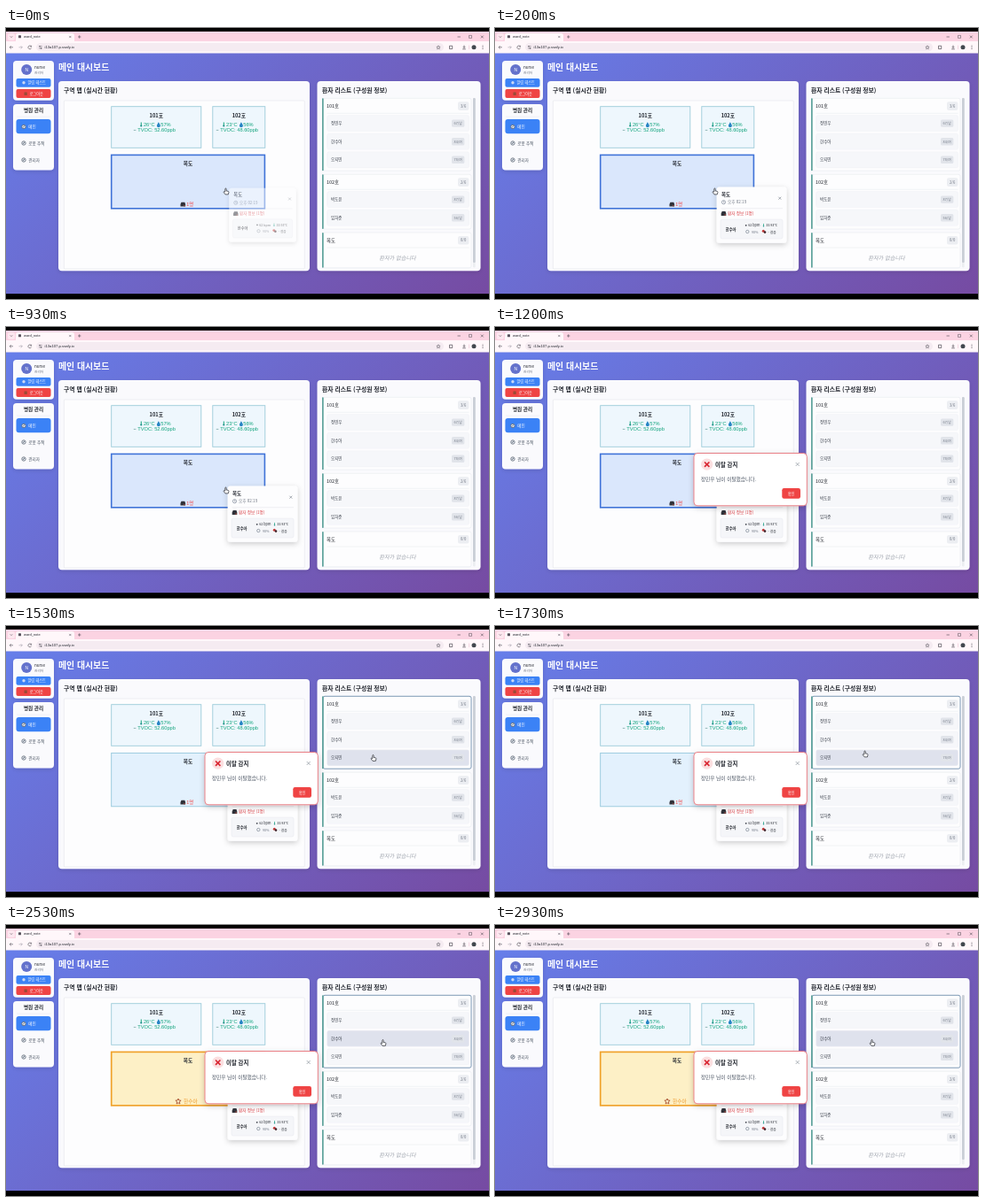
Animation, 544 px wide and 306 px high, one loop 2990 ms. Source, as an HTML page:

```html
<!DOCTYPE html>
<html lang="ko">
<head>
<meta charset="utf-8">
<style>
html, body { margin: 0; width: 100%; height: 100%; overflow: hidden; background: #000; }
svg { display: block; width: 100vw; height: 100vh; }
text { font-family: "Noto Sans CJK KR", "Noto Sans CJK JP", "Noto Sans CJK", sans-serif; white-space: pre; }
.latin { font-family: "Liberation Sans", Arial, sans-serif; }
.b { font-weight: 700; }
.m { font-weight: 500; }
</style>
</head>
<body>
<svg id="stage" viewBox="0 0 544 306"></svg>
<script>
const LOOP = 2990;
const INK = '#20242c', GREY = '#707784', RED = '#ef4444', BLUE = '#3b82f6', GREEN = '#10a37c';

const text = (x, y, size, str, fill = INK, more = '') =>
  `<text x="${x}" y="${y}" font-size="${size}" fill="${fill}" ${more}>${str}</text>`;
const mid = (x, y, size, str, fill, cls = '') =>
  text(x, y, size, str, fill, `text-anchor="middle" class="${cls}"`);
const rect = (x, y, x2, y2, fill, r = 0, more = '') =>
  `<rect x="${x}" y="${y}" width="${x2 - x}" height="${y2 - y}" rx="${r}" fill="${fill}" ${more}/>`;
const dot = (x, y, r, fill, more = '') => `<circle cx="${x}" cy="${y}" r="${r}" fill="${fill}" ${more}/>`;
const line = (d, stroke, w = .6, more = '') =>
  `<path d="${d}" fill="none" stroke="${stroke}" stroke-width="${w}" ${more}/>`;
const shape = (d, fill, more = '') => `<path d="${d}" fill="${fill}" ${more}/>`;
const cross = (x, y, r, stroke, w) =>
  line(`M${x - r} ${y - r}l${2 * r} ${2 * r}m0 ${-2 * r}l${-2 * r} ${2 * r}`, stroke, w);

const drop = (x, y, s = 1) =>
  shape('M0-3C1-1 2 0 2 1A2 2 0 0 1-2 1C-2 0-1-1 0-3Z', '#2684c4', `transform="translate(${x} ${y}) scale(${s})"`);
const thermo = (x, y, s = 1) => `<g transform="translate(${x} ${y}) scale(${s})">` +
  line('M0-2.5V1', GREEN, 1) + dot(0, 1.5, 1.1, '#1b8f86') + '</g>';
const people = (x, y) => shape(
  `M${x - 2.8} ${y + 2.6}v-2.6l1-2.3h3.8l.8 2.3v2.6z`, '#30323a') + dot(x + 1.6, y + 1.6, .9, '#8a4a44');

function chrome() {
  const c = '#4a4650';
  return rect(0, 4, 544, 16, '#fbd3e2') + rect(11, 6, 77, 18, '#fff7fa', 2.5) +
    rect(0, 15, 544, 28.5, '#fff7fa') + rect(34, 17, 493, 26.5, '#f5ebf1', 4.7) +
    rect(2, 6, 10, 14, '#fde7ef', 2) + line('M4.8 9.4l1.2 1.2l1.2-1.2', c) +
    rect(14, 8.3, 17, 11.3, '#58535e', .5) + text(20, 11.4, 4, 'ward_note', INK, 'class="latin"') +
    cross(72.3, 10, 1.1, c, .5) + line('M81 10h3.4m-1.7-1.7v3.4', c) +
    line('M508.5 10h3.4', c) + line('M521.5 8.4h3v3h-3z', c, .5) + cross(536.3, 10, 1.4, c, .6) +
    line('M8 21.8H4.2m1.6-1.6l-1.6 1.6l1.6 1.6', c) + line('M14.5 21.8h3.8m-1.6-1.6l1.6 1.6l-1.6 1.6', '#a59ea9') +
    line('M28.4 20.8a1.9 1.9 0 1 0 .2 1.8m0-2.8v1.3h-1.4', c) +
    line('M37 20.7h3.6m-3.6 2.2h3.6', c, .5) + dot(38, 20.7, .6, c) + dot(39.6, 22.9, .6, c) +
    text(43.5, 23.4, 4.2, 'i13a107.p.ssafy.io', INK, 'class="latin"') +
    line('M487 19.8l.6 1.4l1.5.1l-1.1 1l.3 1.5l-1.3-.8l-1.3.8l.3-1.5l-1.1-1l1.5-.1z', c, .5) +
    line('M499.5 20.2h3.2v3.4h-3.2z', c, .7) + line('M516 19.6v2.8m-1.2-1.2l1.2 1.2l1.2-1.2m-3 2.6h3.6', c, .7) +
    line('M521.5 19.5v4.6', '#e9b9cc', .5) + dot(527, 21.8, 2.5, '#42484f') +
    [20.1, 21.8, 23.5].map(y => dot(537, y, .5, c)).join('');
}

function sidebar() {
  const icon = (x, y) => dot(x, y, 2.2, '#e8edf3', 'stroke="#4b5563" stroke-width=".7"') +
    line(`M${x - 1} ${y + .8}l2-1.8`, '#4b5563', .8);
  return rect(8, 37, 54, 81.8, '#fafafd', 4, 'filter="url(#soft)"') +
    dot(23.2, 47, 6, '#6472cc') + mid(23.2, 48.8, 5, 'N', '#fff', 'latin') +
    text(32, 46.3, 4.6, 'nurse', INK, 'class="m"') + text(32, 51.6, 3.7, '관리자', GREY) +
    rect(11.5, 57, 50.5, 66.8, BLUE, 2) + dot(20, 61.8, 1.7, '#cbd9f4') + text(24.5, 63.4, 4.2, '알림 테스트', '#fff') +
    rect(11.5, 69, 50.5, 79, RED, 2) + rect(20.5, 72.5, 23.8, 76, '#9c4a36', .5) + text(26.5, 75.6, 4.2, '로그아웃', '#fff') +
    rect(8, 86, 54, 160.5, '#fafafd', 4, 'filter="url(#soft)"') +
    mid(31, 95.2, 5.6, '병원 관리', INK, 'b') + line('M12 100h38.5', '#e4e7ec', .5) +
    rect(11.5, 103, 50.5, 119.2, BLUE, 3) + icon(20, 111.5) + text(25.3, 113.2, 4.6, '메인', '#fff', 'class="m"') +
    icon(20, 130) + text(25.3, 131.8, 4.6, '로봇 추적', '#4b5563') +
    icon(20, 149) + text(25.3, 150.8, 4.6, '관리자', '#4b5563');
}

function room(x1, x2, name, temp, wet, tvoc) {
  const c = (x1 + x2) / 2, g = 'class="latin"';
  return rect(x1, 88.7, x2, 135.3, '#eef7fd', 0, 'stroke="#9ccbd9" stroke-width=".9"') +
    mid(c, 101.4, 5.7, name, INK, 'b') +
    thermo(c - 17, 109) + text(c - 14.3, 111.1, 5.7, temp + '°C', GREEN, g) +
    drop(c + 2.6, 109.2) + text(c + 5, 111.1, 5.7, wet + '%', GREEN, g) +
    line(`M${c - 25.5} 115.4h2.6`, '#7ca6a5', .8) + text(c - 21, 117, 5.7, `TVOC: ${tvoc}ppb`, GREEN, g);
}

function map() {
  return rect(59, 60, 342, 274.3, '#fafafd', 4, 'filter="url(#soft)"') +
    text(65, 73.4, 6.8, '구역 맵 (실시간 현황)', INK, 'class="b"') +
    rect(65.3, 82, 336.3, 272, '#fdfdfe', 1, 'stroke="#e3e5ea" stroke-width=".6"') +
    room(118.7, 219.8, '101호', 26, 57, '52.60') + room(232.8, 291.8, '102호', 23, 56, '48.60') +
    rect(118.7, 143.4, 291.4, 203.8, '#dae7fc', 0, 'id="hall"') + mid(205, 155.4, 5.7, '복도', INK, 'b') +
    '<g id="count">' + people(199.3, 199) + text(203.3, 201, 5.4, '1명', RED) + '</g>' +
    '<g id="found">' + line('M194 196l.9 2l2.2.2l-1.7 1.5l.5 2.2l-1.9-1.1l-1.9 1.1l.5-2.2l-1.7-1.5l2.2-.2z', '#a9502f', .9) +
    text(200, 200.9, 5.7, '한수아', '#ee9a2b') + '</g>';
}

function ward(y1, y2, name, count, rows, id = '') {
  return rect(357, y1, 524, y2, '#fdfdfe', 2, `${id} stroke="#e1e4ea" stroke-width=".5"`) +
    rect(356, y1, 357.7, y2, '#5ea39c', .8) +
    text(361, y1 + 10.7, 5.4, name, INK, 'class="m"') +
    rect(509, y1 + 4, 521.3, y1 + 13.6, '#eceef2', 2) + mid(515.1, y1 + 10.3, 4.2, count, GREY) +
    line(`M361.5 ${y1 + 17}h160`, '#e3e6eb', .5) +
    rows.map(([who, age], i) => {
      const y = y1 + 28.3 + i * 20.6;
      return rect(361.7, y - 9, 521.5, y + 9, '#f6f7fa', 2, `${id && `id="row${i}"`} stroke="#eceef2" stroke-width=".4"`) +
        text(366, y + 1.6, 4.5, who, '#343a45') +
        rect(502, y - 4.2, 516.3, y + 4.2, '#e1e4ea', 1.5) + mid(509.2, y + 1.4, 3.8, age, GREY);
    }).join('');
}

function list() {
  return rect(350.5, 60, 534.5, 274.3, '#fafafd', 4, 'filter="url(#soft)"') +
    text(356, 73.4, 6.8, '환자 리스트 (구성원 정보)', INK, 'class="b"') +
    rect(526, 79, 528.7, 270.5, '#eceef1', 1.3) + rect(526, 79, 528.7, 265, '#c9ced6', 1.3) +
    ward(79.3, 161.2, '101호', '3/6', [['정민우', '67/남'], ['한수아', '84/여'], ['오지민', '78/여']], 'id="ward"') +
    ward(165.3, 227, '102호', '2/6', [['박도윤', '87/남'], ['임하준', '56/남']]) +
    ward(231, 270.8, '복도', '0/0', []) +
    text(0, 0, 6.2, '환자가 없습니다', '#a2a7b0', 'text-anchor="middle" transform="translate(441 261.5) skewX(-12)"');
}

function popup() {
  const s = 3.7;
  return '<g id="popup">' + rect(249.7, 179.4, 328.3, 242.8, '#fdfdfe', 3, 'filter="url(#deep)"') +
    text(255, 189.6, 5.5, '복도', INK, 'class="b"') + cross(320.8, 192.2, 1.5, GREY, .6) +
    dot(257.5, 196.7, 2.1, 'none', 'stroke="#697586" stroke-width=".6"') + line('M257.5 195.4v1.5h1.1', '#697586', .5) +
    text(262, 198.4, 4.6, '오후 02:19', GREY) + line('M254.5 203.7h69.5', '#dfe2e7', .5) +
    people(257.5, 209.4) + text(262, 211.4, 4.6, '환자 정보 (1명)', '#d9393f', 'class="m"') +
    rect(254, 216, 324, 238, '#f5f6f9', 2, 'stroke="#e5e7ec" stroke-width=".5"') +
    text(259.7, 228.6, 4.3, '한수아', INK, 'class="b"') +
    dot(282.7, 222.8, .9, '#3b3f49') + text(285.2, 224.2, s, '62 bpm') +
    thermo(302.5, 222.7, .7) + text(305.2, 224.2, s, '33.93°C') +
    dot(284.3, 230, 1.7, 'none', 'stroke="#7b8794" stroke-width=".7"') + text(289, 231.5, s, '98%', GREY) +
    dot(302.3, 229.3, 1.5, '#c23b3b') + dot(304, 230.6, 1.3, '#40252b') + text(307.5, 231.5, s, '- 걸음') + '</g>';
}

function alertBox() {
  return '<g id="alert">' + rect(224, 142.5, 351.3, 201.8, '#fff', 4, 'stroke="#e8737a" stroke-width=".9" filter="url(#deep)"') +
    dot(238.7, 155.2, 6.6, '#fbdfe0') + cross(238.7, 155.2, 2.7, '#d92632', 1.7) +
    text(248, 157.6, 6.4, '이탈 감지', INK, 'class="b"') + cross(340.7, 155, 2, '#8c929d', .7) +
    text(231.8, 173.6, 5.7, '정민우 님이 이탈했습니다.', '#4b5563') +
    rect(323.3, 182, 344, 193.8, RED, 2.2) + mid(333.6, 189.5, 4.2, '확인', '#fff', 'm') + '</g>';
}

const hand = shape('M-1.2-2.6C-1.2-3.8.1-3.8.1-2.6V-.6L2-.2C2.8 0 3 .4 2.9 1.1L2.3 3.4H-1L-2.9.9C-3.2.2-2.2-.2-1.2.7Z',
  '#fff', 'id="hand" stroke="#22252b" stroke-width=".7"');

const stage = document.getElementById('stage');
stage.innerHTML = `<defs>
  <linearGradient id="sky" gradientUnits="userSpaceOnUse" x1="68" y1="-40" x2="476" y2="368">
    <stop stop-color="#667eea"/><stop offset="1" stop-color="#764ba2"/></linearGradient>
  <filter id="soft"><feDropShadow dx="0" dy="1.5" stdDeviation="2" flood-opacity=".13"/></filter>
  <filter id="deep" x="-20%" y="-20%" width="140%" height="150%"><feDropShadow dx="0" dy="2" stdDeviation="3" flood-opacity=".2"/></filter>
</defs>` + rect(0, 0, 544, 306, '#000') + rect(0, 28, 544, 300, 'url(#sky)') + chrome() + sidebar() +
  text(59, 48.2, 9.9, '메인 대시보드', '#fff', 'class="b"') + map() + list() + popup() + alertBox() + hand;

const set = (id, attrs) => {
  const el = document.getElementById(id);
  for (const k in attrs) el.setAttribute(k, attrs[k]);
};
const ease = (t, from, to) => {
  const p = Math.min(1, Math.max(0, (t - from) / (to - from)));
  return p * p * (3 - 2 * p);
};
const hallLooks = {
  hover: ['#dae7fc', '#3f73d8', 1.6],
  idle: ['#e3f1fd', '#94c8dc', .9],
  found: ['#fdf0c6', '#f0a22a', 1.7],
};

function draw(t) {
  const shown = .5 + .5 * ease(t, 0, 200), scale = .92 + .08 * shown;
  set('popup', { opacity: shown, transform: `translate(289 211.5) scale(${scale}) translate(-289 -211.5)` });
  set('alert', { opacity: ease(t, 1060, 1190) });

  // The pointer leaves the hall, then visits two patient rows.
  const out = ease(t, 1270, 1480), up = ease(t, 1640, 1900);
  const x = t < 1130 ? 248 : 351 + 63 * out + 11 * up;
  const y = t < 1130 ? 184.5 : 165 - 16 * out - 16 * up;
  set('hand', { transform: `translate(${x} ${y})`, opacity: t >= 1130 && t < 1270 ? 0 : 1 });

  const over = t < 1270 || x < 362 ? -1 : y > 138 ? 2 : 1;
  [0, 1, 2].forEach(i => set('row' + i, { fill: i === over ? '#dfe2ed' : '#f6f7fa' }));
  set('ward', { stroke: over < 0 ? '#e1e4ea' : '#708fae', 'stroke-width': over < 0 ? .5 : .9 });

  const [fill, stroke, width] = hallLooks[t < 1270 ? 'hover' : over === 1 ? 'found' : 'idle'];
  set('hall', { fill, stroke, 'stroke-width': width });
  set('count', { opacity: over === 1 ? 0 : 1 });
  set('found', { opacity: over === 1 ? 1 : 0 });
}

const start = performance.now();
function tick() {
  draw((performance.now() - start) % LOOP);
  requestAnimationFrame(tick);
}
tick();
</script>
</body>
</html>
```
